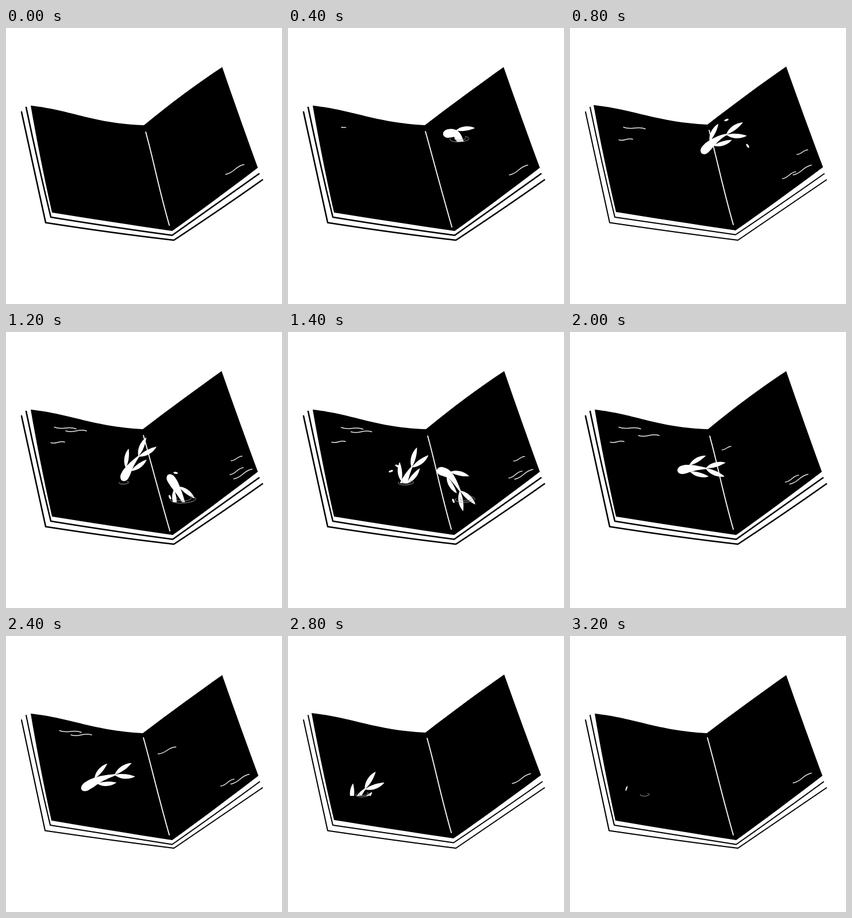
Animation of 480x480 px, one loop 3.3 s. Source, as an HTML page with a canvas:

```html
<!DOCTYPE html>
<html lang="en">
<head>
<meta charset="utf-8">
<title>Book pond</title>
<style>
html, body { margin: 0; width: 100%; height: 100%; overflow: hidden; background: #fff; }
canvas { display: block; width: 480px; height: 480px; }
</style>
</head>
<body>
<canvas id="stage" width="480" height="480"></canvas>
<script>
const ctx = document.getElementById('stage').getContext('2d');
const STEP = 100, COUNT = 33;

// Page corners: top left, fold, top right, bottom right, fold, bottom left
const corners = [[43, 135], [240, 169], [376, 68], [438, 243], [289, 353], [80, 321]];

// Redrawn variants: corner shifts, lift, fold drop, spine ends, line weight, bend
const books = [
  { dx: [0, 0, 0, 0, 0, 0], dy: 0, drop: 0, spine: [243, 181, 284, 343], w: 2.6, bend: 3 },
  { dx: [-2, -1, 0, 2, -1, 0], dy: -1, drop: 0, spine: [242, 178, 284, 342], w: 2, bend: 1.5 },
  { dx: [0, -2, -1, 0, 1, 0], dy: 0, drop: 0, spine: [239, 180, 285, 346], w: 2.6, bend: 1 },
  { dx: [0, -2, 0, 1, 0, -1], dy: 0, drop: 2, spine: [239, 177, 284, 346], w: 2.1, bend: 1 }
];
const boil = n => ([0, 2, 1, 2, 0, 0, 3, 1, 3][n >> 2] + n % 4) % 4;

// Head positions, two steps of time apart
const fishes = [
  { t0: 0, out: [5, 198], dive: [11, 263], end: 18.6,
    path: [[306, 202], [292, 184], [270, 186], [248, 199], [229, 218], [214, 237], [203, 259], [197, 284]] },
  { t0: 8, out: [14, 296], dive: [24.5, 278], end: 31.9,
    path: [[311, 300], [298, 274], [281, 249], [259, 240], [234, 237], [210, 237], [187, 242], [159, 251], [132, 268], [118, 290], [109, 314]] }
];

// x, y, start, end, radius
const ripples = [
  [298, 193, 0, 7, 17], [205, 262, 11, 19, 14],
  [308, 291, 8.5, 15.5, 22], [130, 276, 25, 33, 13]
];

// time, x, y, speed x, speed y, half life
const drops = [
  [8, 309, 205, 2, 3, 3.5], [7, 275, 159, -3, 1, 2],
  [12, 295, 245, 3.5, .6, 2], [12, 285, 287, 1.2, 3.2, 2],
  [16, 310, 247, 3.5, .6, 2], [16, 290, 300, 1.2, 3.2, 2],
  [16, 186, 231, -2, -1, 2], [16, 173, 244, -3, 1, 2.5]
];

// First full time, growing time, span, then centres four steps apart
const waves = [
  { t0: 8, grow: 5, span: [38, 3], at: [[112, 174], [103, 167], [120, 168], [104, 167], [112, 166]] },
  { t0: 12, grow: 4, span: [36, 0], at: [[122, 172], [133, 175], [137, 180], [131, 172]] },
  { t0: 8, grow: 4, span: [24, -1], at: [[97, 194], [90, 192], [86, 190], [82, 191]] },
  { t0: 8, grow: 4, span: [19, -8], at: [[404, 216], [401, 220], [403, 221]] },
  { t0: 24, grow: 8, span: [31, -12], at: [[280, 199]] },
  { t0: 8, grow: 4, span: [23, -12], at: [[381, 256], [401, 242], [390, 254], [386, 255], [385, 255]] },
  { t0: 0, grow: 4, span: [32, -17], at: [[398, 246], [401, 247], [404, 247], [412, 247], [408, 248], [398, 256], [407, 249], [406, 248], [404, 247]] }
];

const mix = (a, b, k) => a + (b - a) * k;

function edge(a, b, bow) {
  const dx = b[0] - a[0], dy = b[1] - a[1], len = Math.hypot(dx, dy);
  const nx = -dy / len * bow, ny = dx / len * bow;
  ctx.bezierCurveTo(a[0] + dx * .35 + nx, a[1] + dy * .35 + ny,
    a[0] + dx * .7 + nx, a[1] + dy * .7 + ny, b[0], b[1]);
}

function sheetLine(pts, bows) {
  ctx.beginPath();
  ctx.moveTo(...pts[0]);
  for (let i = 1; i < pts.length; i++) edge(pts[i - 1], pts[i], bows[i - 1]);
  ctx.stroke();
}

function drawBook(n) {
  const b = books[n];
  const [tl, tc, tr, br, bc, bl] = corners.map(([x, y], i) => [x + b.dx[i], y + b.dy + (i === 4 ? b.drop : 0)]);
  ctx.fillStyle = ctx.strokeStyle = '#000';
  ctx.lineCap = ctx.lineJoin = 'round';
  ctx.beginPath();
  ctx.moveTo(...tl);
  ctx.bezierCurveTo(tl[0] + 72, tl[1] + 8, tc[0] - 88, tc[1] - 6 + b.bend, ...tc);
  edge(tc, tr, -b.bend);
  edge(tr, br, .5);
  edge(br, bc, -1);
  edge(bc, bl, -.5);
  edge(bl, tl, -1.5);
  ctx.fill();
  ctx.lineWidth = b.w;
  const j = n % 2 * .7;
  sheetLine([[35, 138], [bl[0] - 2, 329], [bc[0], bc[1] + 7.5], [br[0] + 2, 253.5]], [1, 1 - j, j]);
  sheetLine([[27, 146], [bl[0] - 11, 338.5], [292, 369], [446, 264]], [.5, 1.5 - j, 1 - j]);
  const [x, y, u, v] = b.spine;
  ctx.strokeStyle = '#f4f4f4';
  ctx.lineWidth = 1.9;
  ctx.beginPath();
  ctx.moveTo(x, y);
  ctx.bezierCurveTo(x + 14, y + 50, u - 20, v - 70, u, v);
  ctx.stroke();
}

function drawWave({ t0, grow, span, at }, t) {
  const last = at.length - 1, s = (t - t0) / 4;
  const c = Math.min(last, Math.max(0, s)), i = Math.floor(c);
  const a = at[i], b = at[Math.min(last, i + 1)];
  const before = Math.max(0, -s * 4 / grow), after = Math.max(0, s - last);
  const size = 1 - before - after, len = Math.hypot(...span) * size;
  if (len < 2) return;
  // grows from its left end, fades towards its right end
  const mid = d => mix(a[d], b[d], c - i) + span[d] * (after - before) / 2;
  const dx = span[0] * size, dy = span[1] * size;
  const x = mid(0) - dx / 2, y = mid(1) - dy / 2;
  const amp = Math.min(5, len * .15), nx = -dy / len * amp, ny = dx / len * amp;
  ctx.strokeStyle = '#e4e4e4';
  ctx.lineWidth = 1.5;
  ctx.beginPath();
  ctx.moveTo(x, y);
  ctx.bezierCurveTo(x + dx * .4 + nx, y + dy * .4 + ny, x + dx * .6 - nx, y + dy * .6 - ny, x + dx, y + dy);
  ctx.stroke();
}

// Catmull-Rom along the swim path, straight beyond its ends
function swim(fish, t) {
  const p = fish.path, last = p.length - 1;
  const ray = (a, b, n) => [0, 1].map(d => a[d] + (b[d] - a[d]) * n);
  const get = n => n < 0 ? ray(p[0], p[1], n) : n > last ? ray(p[last], p[last - 1], last - n) : p[n];
  const s = (t - fish.t0) / 2, i = Math.floor(s), k = s - i;
  const [a, b, c, e] = [get(i - 1), get(i), get(i + 1), get(i + 2)];
  return [0, 1].map(d => b[d] + .5 * k * (c[d] - a[d] + k * (2 * a[d] - 5 * b[d] + 4 * c[d] - e[d]
    + k * (3 * (b[d] - c[d]) + e[d] - a[d]))));
}

// Angle pointing from head to tail
function backward(fish, t) {
  const a = swim(fish, t + .2), b = swim(fish, t - .2);
  return Math.atan2(b[1] - a[1], b[0] - a[0]);
}

function leaf(x, y, angle, len, width, side) {
  ctx.save();
  ctx.translate(x, y);
  ctx.rotate(angle);
  ctx.beginPath();
  ctx.moveTo(0, 0);
  ctx.bezierCurveTo(len * .3, side * width, len * .75, side * width * .8, len, 0);
  ctx.bezierCurveTo(len * .75, -side * width * .3, len * .4, -side * width * .55, 0, 0);
  ctx.fill();
  ctx.restore();
}

// Half width of the body: round head, thin tail joint
function girth(q) {
  const h = Math.min(1, q * 5.5);
  return 7.4 * Math.sqrt(h * (2 - h)) * (q < .3 ? 1 : mix(1, .14, (q - .3) / .7));
}

function drawFish(fish, t) {
  if (t <= fish.t0 || t >= fish.end) return;
  ctx.save();
  const level = t < fish.out[0] ? fish.out[1] : t >= fish.dive[0] ? fish.dive[1] : 480;
  ctx.beginPath();
  ctx.rect(0, 0, 480, level);
  ctx.clip();
  ctx.fillStyle = '#fff';
  const left = [], right = [], joint = 4.3;
  for (let i = 0; i <= 24; i++) {
    const q = (i / 24) ** 2, s = t - q * joint;
    const [x, y] = swim(fish, s), a = backward(fish, s), w = girth(q);
    left.push([x - Math.sin(a) * w, y + Math.cos(a) * w]);
    right.unshift([x + Math.sin(a) * w, y - Math.cos(a) * w]);
  }
  ctx.beginPath();
  left.concat(right).forEach(p => ctx.lineTo(...p));
  ctx.fill();
  for (const side of [-1, 1]) {
    const s = t - 1.8, [x, y] = swim(fish, s), a = backward(fish, s);
    leaf(x - Math.sin(a) * 5 * side, y + Math.cos(a) * 5 * side, a + side * .4, 34, 7.5, side);
    const [u, v] = swim(fish, t - joint + .15);
    leaf(u, v, backward(fish, t - joint) + side * .34, 36, 8, side);
  }
  ctx.restore();
}

function drawRipple([x, y, from, to, size], t) {
  if (t <= from || t >= to) return;
  const r = size * Math.sqrt(Math.sin(Math.PI * (t - from) / (to - from)));
  ctx.strokeStyle = '#999';
  ctx.lineWidth = 1;
  ctx.beginPath();
  ctx.ellipse(x, y, r, r * .3, -.05, -.9, Math.PI + .5);
  ctx.stroke();
  if (r < 9) return;
  ctx.beginPath();
  ctx.ellipse(x + 1, y - 1, r * .6, r * .18, -.05, -.3, Math.PI * 1.2);
  ctx.stroke();
}

function drawDrop([mid, x, y, vx, vy, half], t) {
  const d = t - mid;
  if (d < -half || d >= half) return;
  ctx.fillStyle = '#fff';
  ctx.beginPath();
  ctx.ellipse(x + vx * d, y + vy * d, 3.8, 1.7, Math.atan2(vy, vx), 0, 7);
  ctx.fill();
}

function draw(t) {
  ctx.fillStyle = '#fff';
  ctx.fillRect(0, 0, 480, 480);
  drawBook(boil(t));
  waves.forEach(w => drawWave(w, t));
  fishes.forEach(f => drawFish(f, t));
  ripples.forEach(r => drawRipple(r, t));
  drops.forEach(d => drawDrop(d, t));
  // late splash left behind by the second dive
  if (t > 29) {
    ctx.fillStyle = '#eee';
    leaf(97 + (32 - t) * 3, 270 - (32 - t) * 3, -1.25, 10, 2.5, -1);
  }
}

const start = performance.now();
function tick() {
  draw(Math.floor(Math.max(0, performance.now() - start) / STEP) % COUNT);
  requestAnimationFrame(tick);
}
tick();
</script>
</body>
</html>
```
